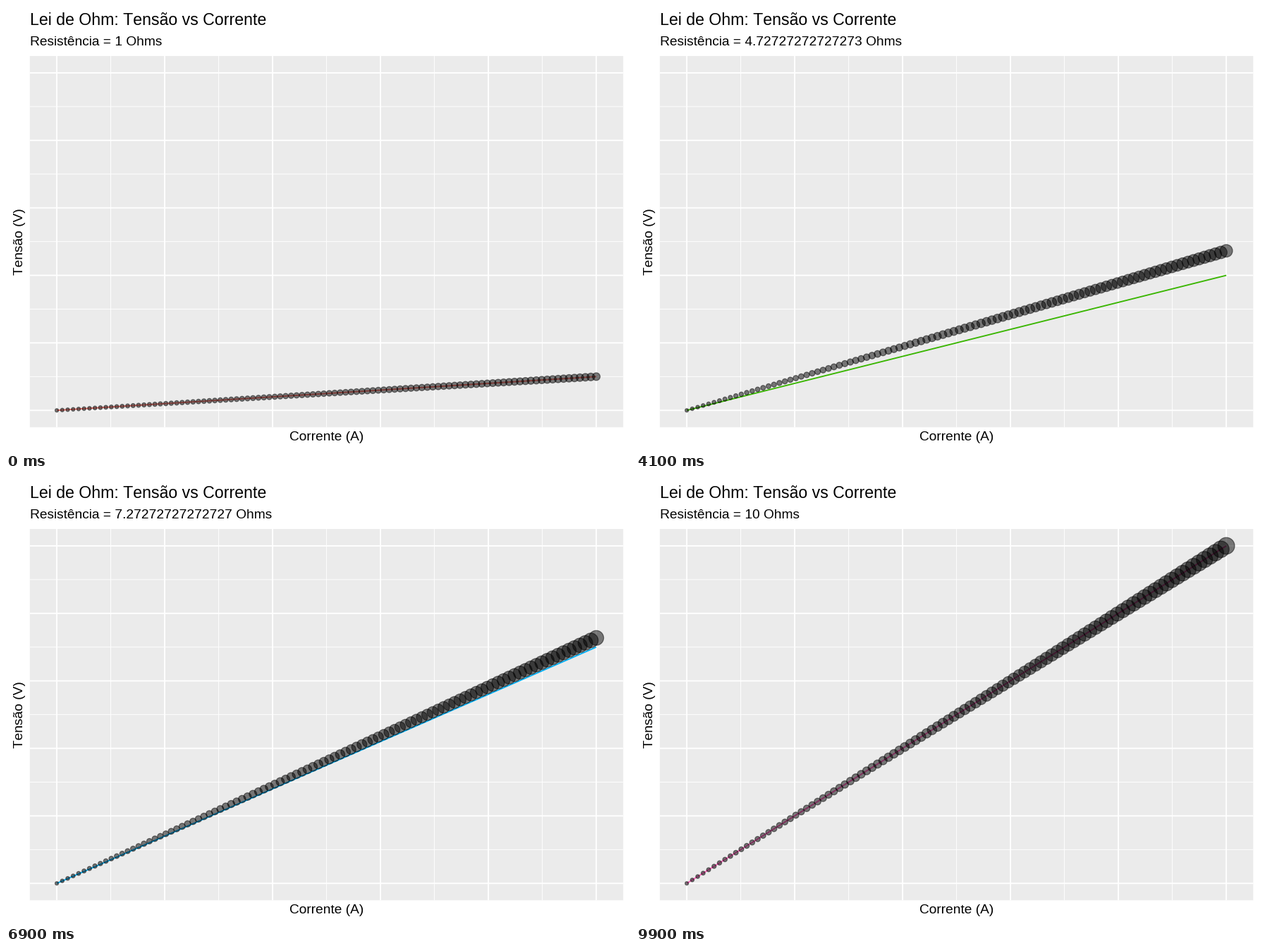
These frames come from a looping animation (885 by 632 pixels, 10000 ms). A matplotlib script:

```python
import numpy as np
import matplotlib.pyplot as plt
from matplotlib.animation import FuncAnimation
from matplotlib.patches import Rectangle

W, H, DPI = 885, 632, 128
PX = 72 / DPI                     # one pixel in points
RES = 126.43                      # plot units per inch
FRAMES, STEP = 100, 11

LEFT, RIGHT, TOP, BOTTOM = 33.8, 875.4, 71.0, 598.25
X0, X1 = LEFT + (RIGHT - LEFT) / 22, RIGHT - (RIGHT - LEFT) / 22
Y0, Y1 = BOTTOM - (BOTTOM - TOP) / 22, TOP + (BOTTOM - TOP) / 22

LINE = 0.5 * 72.27 / 25.4 * RES / 96 * PX
STROKE = 0.945 * RES / 96 * PX
HUES = ["#F8766D", "#D89000", "#A3A500", "#39B600", "#00BF7D",
        "#00BFC4", "#00B0F6", "#9590FF", "#E76BF3", "#FF62BC"]

plt.rcParams["font.family"] = "Liberation Sans"
plt.rcParams["text.kerning_factor"] = 6    # no kerning
fig = plt.figure(figsize=(W / DPI, H / DPI), dpi=DPI, facecolor="white")
ax = fig.add_axes([0, 0, 1, 1])
ax.set(xlim=(0, W), ylim=(H, 0))
ax.axis("off")


def label(x, y, text, size, **kw):
    return ax.text(x, y, text, size=size * PX, color="black",
                   va="baseline", **kw)


def grid(start, stop, width):
    for t in np.arange(start, stop, 0.2):
        x, y = X0 + t * (X1 - X0), Y0 + t * (Y1 - Y0)
        style = dict(color="white", lw=width, snap=False,
                     solid_capstyle="butt")
        ax.plot([LEFT, RIGHT], [y, y], **style)
        ax.plot([x, x], [TOP, BOTTOM], **style)


ax.add_patch(Rectangle((LEFT, TOP), RIGHT - LEFT, BOTTOM - TOP,
                       fc="#EBEBEB", ec="none", snap=False))
grid(0.1, 1, LINE / 2)
grid(0, 1.1, LINE)

label(LEFT, 27, "Lei de Ohm: Tensão vs Corrente", 23.17)
subtitle = label(LEFT, 56.3, "", 19.1)
label((LEFT + RIGHT) / 2, 617.4, "Corrente (A)", 19.1, ha="center")
label(24.3, (TOP + BOTTOM) / 2, "Tensão (V)", 19.1, ha="center",
      rotation=90, rotation_mode="anchor")

current = np.linspace(0, 1, 100)
xs = X0 + current * (X1 - X0)
line, = ax.plot([], [], lw=LINE, solid_capstyle="butt", zorder=3)
dots = ax.scatter(xs, xs, s=1, facecolor=(0, 0, 0, 0.5),
                  edgecolor=(0, 0, 0, 0.5), linewidth=STROKE, zorder=4)


def volts_y(v):
    return Y0 + v * (Y1 - Y0)


def update(i):
    ohms = 1 + i / STEP
    level = 1 + i // STEP
    subtitle.set_text(f"Resistência = {ohms:.15g} Ohms")

    line.set_data([X0, X1], [Y0, volts_y(level / 10)])
    line.set_color(HUES[level - 1])

    # dot area follows power, I²R, tweened between whole resistances
    a, b = np.sqrt([level / 10, (level + 1) / 10])
    size = 1 + 5 * current * (a + (b - a) * (ohms - level))
    diameter = 0.75 * (size * 72.27 / 25.4 + 0.945) * RES / 72 * PX
    dots.set_offsets(np.column_stack([xs, volts_y(current * ohms / 10)]))
    dots.set_sizes(diameter ** 2)
    return line, dots, subtitle


anim = FuncAnimation(fig, update, frames=FRAMES, interval=100,
                     repeat=True, repeat_delay=0)
plt.show()
```
